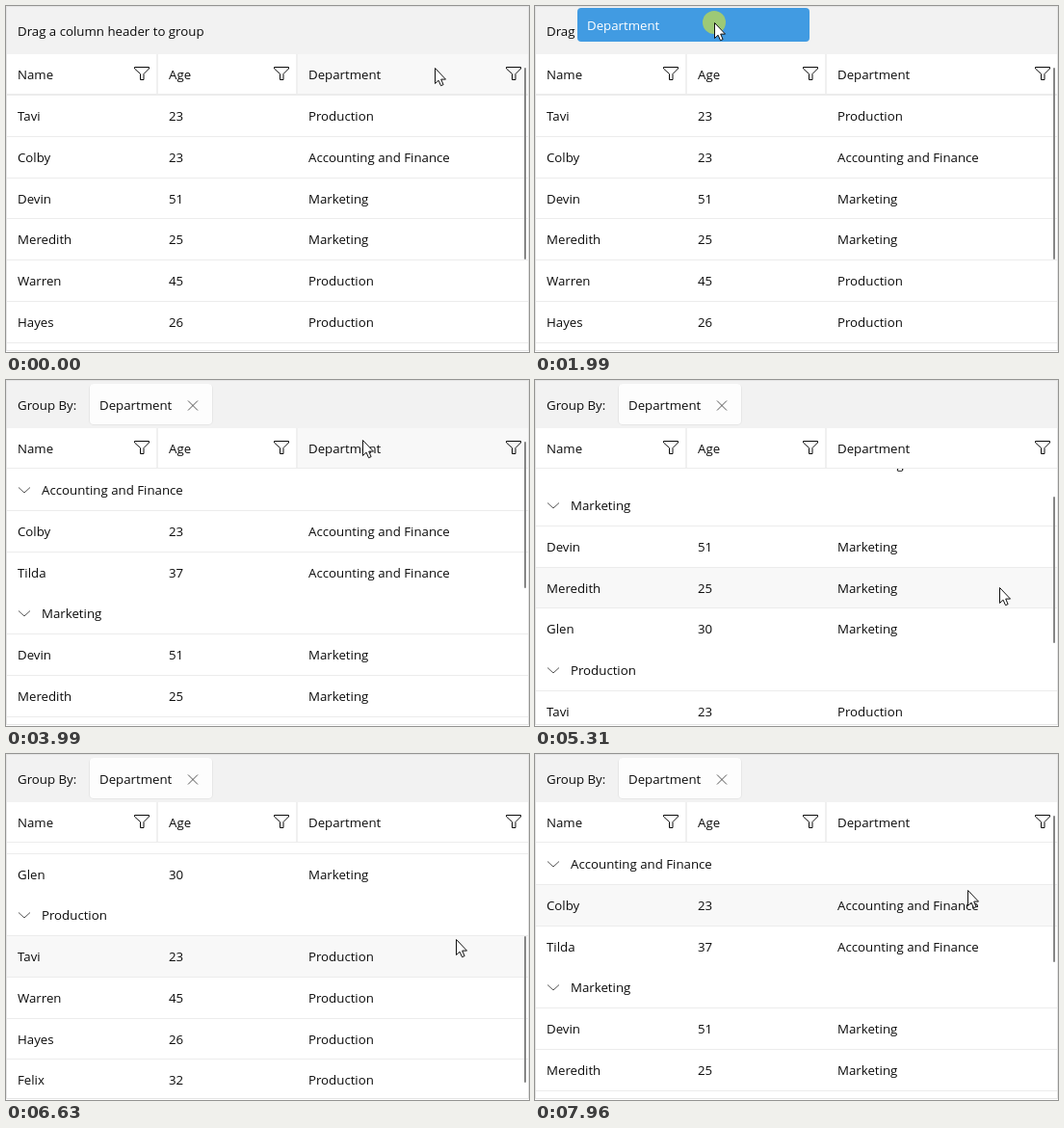
Animation of 543 by 359 pixels, one loop 8000 ms. Source, as an HTML page with a canvas:

```html
<!DOCTYPE html>
<html lang="en">
<head>
<meta charset="utf-8">
<title>Grid grouping</title>
<style>
  html, body { margin: 0; width: 100%; height: 100%; overflow: hidden; background: #fff; }
  canvas { display: block; }
</style>
</head>
<body>
<canvas id="stage" width="543" height="359"></canvas>
<script>
const ctx = document.getElementById('stage').getContext('2d');
const W = 543, H = 359, LOOP = 8000, STEP = 69.4;
const ROWS_TOP = 92, ROW_HEIGHT = 42.75;
const PRESS = 390, DROP = 2530, REGROUP = 2600;
const INK = '#0c0c0c', LINE = '#ececec', HOVER = '#f8f8f8';

const edges = [1, 158, 303, W + 1];
const columns = ['Name', 'Age', 'Department'].map((title, i) => ({
  title, left: edges[i], right: edges[i + 1], text: edges[i] + 11, filter: edges[i + 1] - 25
}));

const departments = ['Accounting and Finance', 'Marketing', 'Production'];
const [finance, marketing, production] = departments;
const people = [
  ['Tavi', 23, production],
  ['Colby', 23, finance],
  ['Devin', 51, marketing],
  ['Meredith', 25, marketing],
  ['Warren', 45, production],
  ['Hayes', 26, production],
  ['Tilda', 37, finance],
  ['Glen', 30, marketing],
  ['Felix', 32, production]
];
const groupedRows = departments.flatMap(name => [[name], ...people.filter(person => person[2] === name)]);
const maxScroll = groupedRows.length * ROW_HEIGHT - (H - ROWS_TOP);

const icons = {
  filter: new Path2D('M.5 .5h15v1.5l-5.5 5.5v6h-3.5v-6l-6 -5.5z'),
  chevron: new Path2D('M-6 -2.5l6 5.5l6 -5.5'),
  close: new Path2D('M-5 -5l10 10M5 -5l-10 10'),
  pointer: new Path2D('M.5 .5v16l3.6 -3.3l2.4 5.5l2.6 -1.1l-2.4 -5.5h4.8z')
};

const progress = (t, start, end) => Math.min(1, Math.max(0, (t - start) / (end - start)));
const softEase = p => (p + p * p * (3 - 2 * p)) / 2;

// Pointer and scroll are sums of overlapping moves
function pose(t) {
  const drag = progress(t, PRESS, 2200), dragged = softEase(drag);
  const nudge = progress(t, 2880, 3640);
  const away = progress(t, 3640, 4480);
  const down = progress(t, 4480, 5317);
  const toEnd = progress(t, 5317, 6410);
  const leave = progress(t, 6640, 7960);
  const back = progress(t, 6640, 7440);
  const lift = Math.abs(Math.sin(Math.PI * drag)) ** 1.3;
  return {
    x: Math.round(445 - 281 * dragged + 23 * nudge + 295 * Math.sin(away * Math.PI / 2) - 15 * toEnd - 18 * leave),
    y: Math.round(64 - 38 * dragged - 46 * lift + 129 * away ** 1.5 + 60 * down - 23 * toEnd - 51 * leave),
    scroll: 112 * down + (maxScroll - 112) * toEnd - maxScroll * back
  };
}

function rect(x, y, w, h, color) {
  ctx.fillStyle = color;
  ctx.fillRect(x, y, w, h);
}

function roundBox(x, y, w, h, radius, color) {
  ctx.beginPath();
  ctx.roundRect(x, y, w, h, radius);
  ctx.fillStyle = color;
  ctx.fill();
}

function text(value, x, baseline, color = INK) {
  ctx.fillStyle = color;
  ctx.fillText(value, x, baseline);
}

function icon(shape, x, y, stroke, fill) {
  ctx.save();
  ctx.translate(x, y);
  if (fill) { ctx.fillStyle = fill; ctx.fill(shape); }
  ctx.strokeStyle = stroke;
  ctx.stroke(shape);
  ctx.restore();
}

function drawRows(rows, scroll, hoverY) {
  const edge = i => Math.round(ROWS_TOP + i * ROW_HEIGHT - scroll);
  rows.forEach((row, i) => {
    const top = edge(i), bottom = edge(i + 1);
    if (row.length === 1) {
      icon(icons.chevron, 19, top + 22, '#555');
      text(row[0], 37, top + 27);
      return;
    }
    if (hoverY >= top && hoverY < bottom) rect(0, top, W, bottom - top, HOVER);
    rect(0, top, W, 1, LINE);
    row.forEach((value, c) => text(value, columns[c].text, top + 27));
  });
}

function drawHeader(hoverX) {
  rect(0, 50, W, 42, '#fff');
  columns.forEach(({ title, left, right, text: textX, filter }, i) => {
    if (hoverX >= left && hoverX < right) rect(left, 50, right - left, 42, HOVER);
    if (i) rect(left - 2, 50, 2, 42, '#f0f0f0');
    text(title, textX, 76);
    icon(icons.filter, filter, 63, INK);
  });
  rect(0, 91, W, 1, LINE);
}

function drawGroupPanel(grouped) {
  rect(0, 0, W, 50, '#f2f2f2');
  if (!grouped) {
    text('Drag a column header to group', 12, 31);
    return;
  }
  text('Group By:', 12, 31);
  roundBox(86, 4, 129, 43, 5, '#e6e6e6');
  roundBox(87, 4, 127, 42, 4, '#fdfdfd');
  text('Department', 97, 31);
  icon(icons.close, 194, 26.5, '#555');
}

function drawDragTag(x, y) {
  roundBox(x - 142, y - 15, 241, 35, 4, '#419be2');
  text('Department', x - 132, y + 8, '#fff');
  roundBox(x - 12, y - 12, 24, 24, 12, 'rgba(250, 248, 10, .5)');
}

function draw(t) {
  const { x, y, scroll } = pose(t);
  const dragging = t >= PRESS && t < DROP;
  const regrouped = t >= REGROUP;
  const overRows = !dragging && y >= ROWS_TOP;
  const overHeader = !dragging && y >= 50 && y < ROWS_TOP;

  ctx.font = '13.25px "Open Sans", "Noto Sans", sans-serif';
  ctx.lineWidth = 1;
  rect(0, 0, W, H, '#fff');
  drawRows(regrouped ? groupedRows : people, scroll, overRows ? y : -1);
  drawGroupPanel(t >= DROP);
  drawHeader(overHeader ? x : -1);
  roundBox(538, Math.round(64 + scroll * .51), 2, regrouped ? 152 : 199, 1, '#868686');
  ctx.strokeStyle = '#e5e5e5';
  ctx.strokeRect(.5, .5, W - 1, H - 2);
  if (dragging) drawDragTag(x, y);
  icon(icons.pointer, x, y, '#111', '#fff');
}

// The picture advances in fixed steps, like a screen recording
function frame(now) {
  const t = now % LOOP;
  draw(PRESS + STEP * Math.floor((t - PRESS) / STEP + .25));
  requestAnimationFrame(frame);
}
requestAnimationFrame(frame);
</script>
</body>
</html>
```
